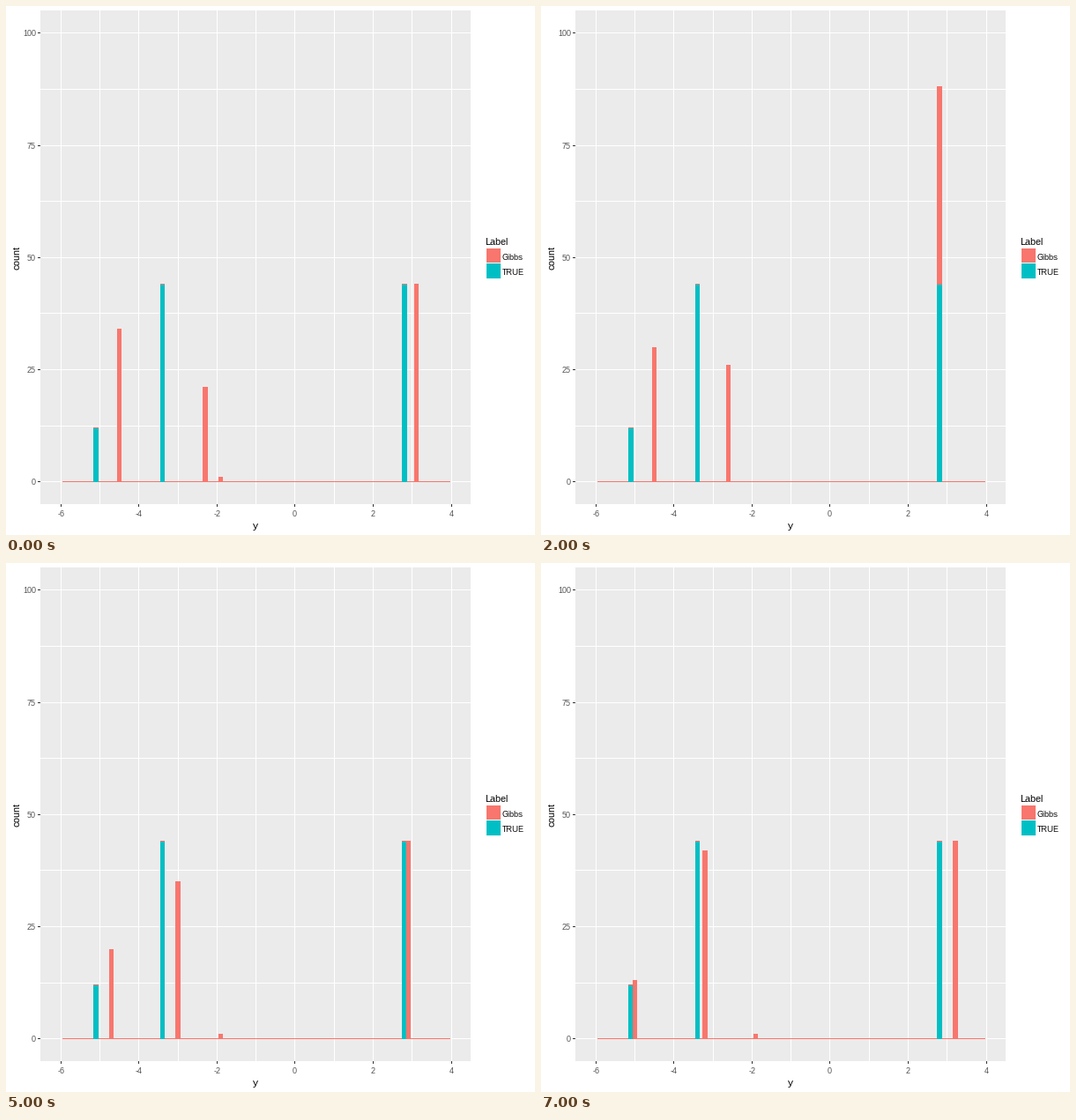
A matplotlib script that plays this animation: 600x600 px, repeating every 8000 ms.

```python
import random

import matplotlib.pyplot as plt
from matplotlib.animation import ArtistAnimation
from matplotlib.patches import Rectangle

plt.rcParams.update({"font.family": "Liberation Sans",
                     "text.hinting": "native",
                     "text.hinting_factor": 1})

RED, TEAL = "#F8766D", "#00BFC4"
PANEL, DARK, GREY = "#EBEBEB", "#333333", "#4D4D4D"
TRUE = {-5.1: 12, -3.4: 44, 2.8: 44}

# Where the three sampled clusters sit, second by second
LOW = [-4.5, -4.7, -4.5, -4.3, -5.0, -4.7, -4.0, -5.0]
MID = [-2.3, -2.8, -2.6, -2.9, -3.4, -3.0, -2.7, -3.2]
HIGH = [3.1, 3.0, 2.8, 2.7, 2.7, 2.9, 2.8, 3.2]
TOTAL, UPPER = 100, 44
LOWER_MEAN = -3.62

random.seed(42)
fig = plt.figure(figsize=(6, 6), dpi=100, facecolor="white")
ax = fig.add_axes([0, 0, 1, 1])
ax.set_xlim(0, 600)
ax.set_ylim(600, 0)
ax.axis("off")


def px(x):
    return 62.07 + 44.32 * (x + 6)


def py(count):
    return 539.4 - 5.091 * count


def box(x0, y0, x1, y1, color, z=1):
    return ax.add_patch(Rectangle((x0, y0), x1 - x0, y1 - y0, fc=color,
                                  lw=0, antialiased=False, zorder=z))


def label(x, y, text, size, color="black", **kw):
    ax.text(x, y, text, fontsize=size * 0.72, color=color,
            va="baseline", **kw)


def bar(x, top, color, z):
    return box(round(px(x) - 2.69), top, round(px(x) + 2.69), 540, color, z)


def sample(low, mid, high):
    """Split the counts so the two lower clusters balance on their mean."""
    lower = TOTAL - UPPER
    n_low = round(lower * (mid - LOWER_MEAN) / (mid - low))
    strays = [round(-2 + 4 * random.random(), 1)
              for _ in range(int(3 * random.random()))]
    return {low: n_low, mid: lower - n_low - len(strays), high: UPPER,
            **dict.fromkeys(strays, 1)}


def bars(counts):
    """Stack the sampled counts on the true ones, drawn left to right."""
    red = {**dict.fromkeys(TRUE, 0), **counts}
    artists = []
    for i, x in enumerate(sorted(red)):
        base, z = TRUE.get(x, 0), 5 + 0.1 * i
        artists.append(bar(x, round(py(base + red[x])), RED, z))
        if base:
            artists.append(bar(x, round(py(base)) + 1, TEAL, z + 0.05))
    return artists


# Panel, grid and axes
box(39, 5, 527, 565, PANEL)
for x in range(-6, 5):
    left = round(px(x) - 0.5)
    box(left, 5, left + 1, 565, "white", 2)
    if x % 2 == 0:
        box(left, 565, left + 1, 568, DARK)
        label(left + 0.5, 579, str(x), 9, GREY, ha="center")
for i in range(9):
    count = 12.5 * i
    top = round(py(count))
    box(39, top, 527, top + 1, "white", 2)
    if i % 2 == 0:
        box(36, top, 39, top + 1, DARK)
        label(34, top + 4, f"{count:.0f}", 9, GREY, ha="right")
box(64, 539, 504, 540, RED, 4)
label(283, 593, "y", 11, ha="center")
label(15.5, 285.5, "count", 11, ha="center", rotation=90,
      rotation_mode="anchor")

# Legend
label(543.5, 271, "Label", 11)
box(545, 275, 561, 291, RED)
box(545, 292, 561, 309, TEAL)
label(562.5, 288, "Gibbs", 9)
label(562.5, 305, "TRUE", 9)

frames = [bars(sample(*spots)) for spots in zip(LOW, MID, HIGH)]
anim = ArtistAnimation(fig, frames, interval=1000, repeat=True,
                       repeat_delay=0)
plt.show()
```
